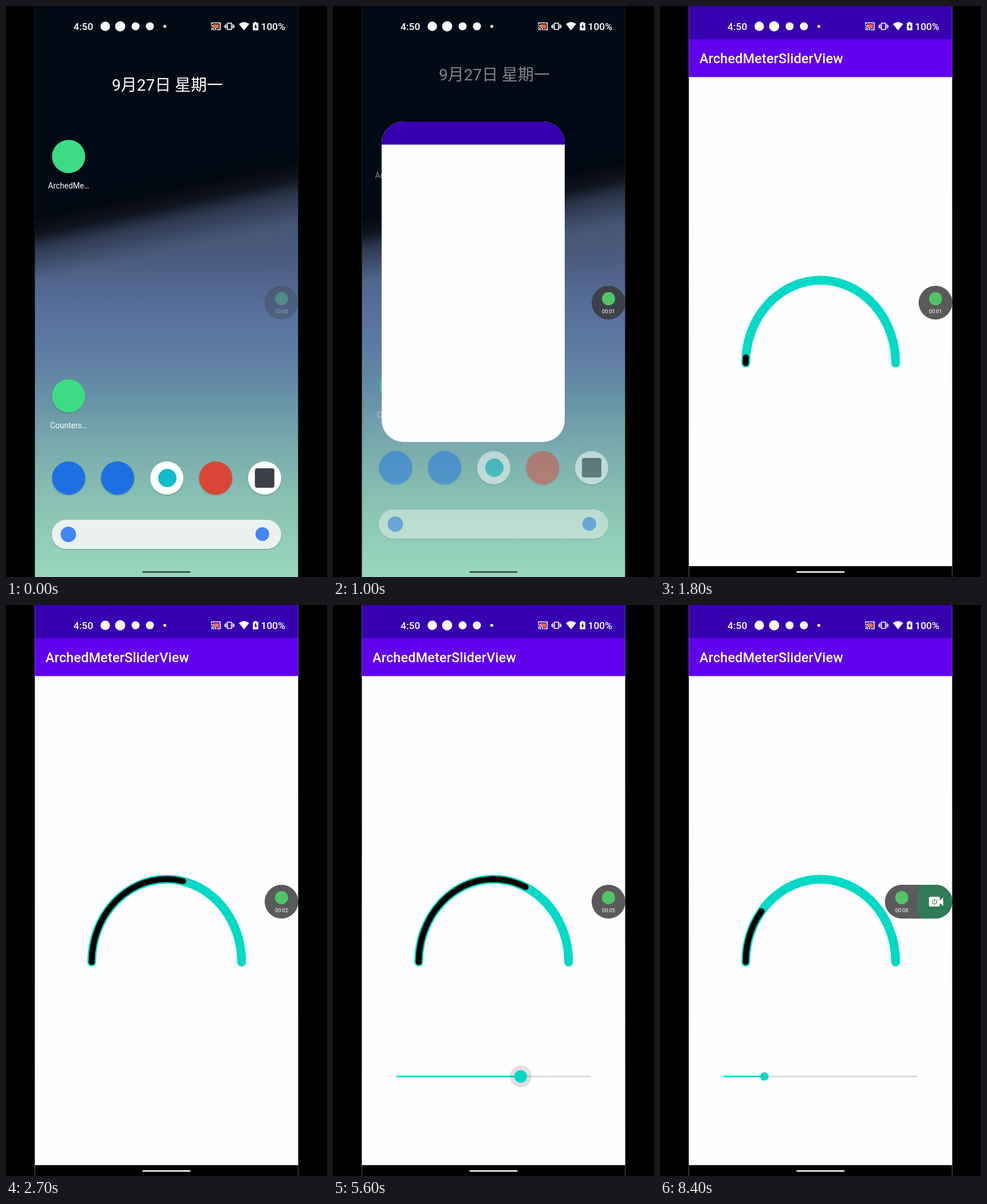
An HTML page that plays this animation: 561x998 px, repeating every 8.5 s.

```html
<!DOCTYPE html>
<html lang="zh-CN">
<head>
<meta charset="utf-8">
<title>Arc slider demo</title>
<style>
  html, body { margin: 0; width: 100%; height: 100%; overflow: hidden; background: #000; }
  svg { display: block; width: 100vw; height: 100vh; }
  text { font-family: Roboto, "Noto Sans CJK SC", "Noto Sans CJK", sans-serif; fill: #fff; }
  .mid { text-anchor: middle; }
  .label { font-size: 13.8px; text-anchor: middle; }
  .date { font-size: 28px; text-anchor: middle; }
  .status { font-size: 17.4px; font-weight: 500; }
  .title { font-size: 23.4px; font-weight: 500; letter-spacing: .0075em; }
  .timer { font-size: 9.2px; text-anchor: middle; }
  .line { fill: none; stroke-linecap: round; }
</style>
</head>
<body>
<svg viewBox="0 0 561 998">
  <defs>
    <linearGradient id="sky" gradientUnits="userSpaceOnUse" x1="0" y1="300" x2="0" y2="998">
      <stop offset="0" stop-color="#3f4d68"/>
      <stop offset=".2" stop-color="#4a5c7e"/>
      <stop offset=".32" stop-color="#566f9a"/>
      <stop offset=".43" stop-color="#5d7ba2"/>
      <stop offset=".54" stop-color="#668fa6"/>
      <stop offset=".66" stop-color="#78a8ad"/>
      <stop offset=".8" stop-color="#88c0b2"/>
      <stop offset="1" stop-color="#9ad8bd"/>
    </linearGradient>
    <linearGradient id="night" gradientUnits="userSpaceOnUse" x1="70" y1="322" x2="101.8" y2="469">
      <stop offset="0" stop-color="#020a16"/>
      <stop offset=".3" stop-color="#030912"/>
      <stop offset=".48" stop-color="#05090f" stop-opacity=".84"/>
      <stop offset=".65" stop-color="#080c14" stop-opacity=".4"/>
      <stop offset="1" stop-color="#101828" stop-opacity="0"/>
    </linearGradient>
    <linearGradient id="shade" x2="0" y2="1">
      <stop offset="0" stop-color="#cfcad6"/>
      <stop offset="1" stop-color="#fefdff"/>
    </linearGradient>
    <filter id="soft" x="-20%" y="-20%" width="140%" height="150%">
      <feDropShadow dx="0" dy="1" stdDeviation="1" flood-opacity=".3"/>
    </filter>
    <clipPath id="screen"><rect x="50.5" width="460" height="998"/></clipPath>
    <clipPath id="frame"><rect id="frameRect"/></clipPath>
  </defs>

  <rect width="561" height="998"/>

  <g clip-path="url(#screen)">
    <rect x="50" width="461" height="998" fill="url(#sky)"/>
    <rect x="50" width="461" height="998" fill="url(#night)"/>
    <g id="home">
      <text class="date" x="282" y="147.5">9月27日 星期一</text>
      <g filter="url(#soft)">
        <circle id="appIcon" cx="109.5" cy="263" r="29" fill="#3ddc84"/>
        <circle cx="109.5" cy="681.5" r="29" fill="#3ddc84"/>
        <circle cx="109.5" cy="825" r="29" fill="#1a6fe3"/>
        <circle cx="195" cy="825" r="29" fill="#1a6fe3"/>
        <circle cx="281" cy="825" r="29" fill="#fff"/>
        <circle cx="366.5" cy="825" r="29" fill="#db4437"/>
        <circle cx="452" cy="825" r="29" fill="#fff"/>
        <rect x="80" y="898" width="401" height="51" rx="25.5" fill="#eaf1ef"/>
      </g>
      <circle cx="282" cy="825" r="16" fill="#12bccb"/>
      <rect x="435" y="808" width="34" height="34" rx="4" fill="#3c4048"/>
      <circle cx="109" cy="923.5" r="13.5" fill="#4285f4"/>
      <circle cx="448" cy="923" r="12" fill="#4285f4"/>
      <text class="label" x="109.5" y="318.5">ArchedMe…</text>
      <text class="label" x="109.5" y="737.5">Counters…</text>
    </g>

    <g id="window" clip-path="url(#frame)">
      <g id="content">
        <rect x="50" width="461" height="998" fill="#fefdff"/>
        <rect x="50" width="461" height="58" fill="#3600b1"/>
        <rect x="50" y="979" width="461" height="19"/>
        <g id="page">
          <rect x="50" y="58" width="461" height="66" fill="#6100ed"/>
          <rect x="50" y="124" width="461" height="3" fill="url(#shade)"/>
          <text class="title" x="69" y="100">ArchedMeterSliderView</text>
          <path id="rail" class="line" stroke="#00dac6" stroke-width="15.4"/>
          <path id="fill" class="line" stroke="#000" stroke-width="10.4"/>
          <g id="slider">
            <path class="line" d="M112 824H449" stroke="#d8d8d8" stroke-width="2.5"/>
            <path id="active" class="line" stroke="#08d3c2" stroke-width="2.7"/>
            <circle id="ripple" cy="824" fill="#000"/>
            <circle id="thumb" cy="824" fill="#03d8c5"/>
          </g>
        </g>
      </g>
    </g>
    <rect id="handle" x="238.5" y="988" width="84" height="2.6" rx="1.3"/>
  </g>

  <g fill="#fff">
    <text class="status" x="118" y="42">4:50</text>
    <circle cx="173.5" cy="35.5" r="8.3"/>
    <circle cx="199.5" cy="35.5" r="8.9"/>
    <circle cx="226.5" cy="35.5" r="7"/>
    <circle cx="251.5" cy="35.5" r="7"/>
    <circle cx="277.5" cy="35.5" r="2.6"/>
    <path d="M362 32H372V39.500H368Q366 35 362 34Z" fill="#ff6a3d"/>
    <g class="line" stroke="#fff" stroke-width="1.6" stroke-linecap="butt">
      <path d="M359.300 32V29.500H374.300V41.500H369M359 34.500A7.500 7.500 0 0 1 366.500 42M359 38A4 4 0 0 1 363 42"/>
      <path d="M387 30H394V41H387ZM384.500 32V39M396.500 32V39M382.500 34V37.500M398.500 34V37.500"/>
    </g>
    <circle cx="360" cy="41" r="1.2"/>
    <path d="M416 42.500L407 31.500Q416 24.500 425 31.500Z"/>
    <path d="M434 28H438V29.500H441V42.500H431.500V29.500H434Z"/>
    <path d="M437 31L433.500 36.800H435.700V41L439 35.200H437Z" fill="#222"/>
    <text class="status" x="445.500" y="42">100%</text>
  </g>

  <g id="widget">
    <rect id="pill" y="489" height="59" rx="29.500" fill="#383838" fill-opacity=".82"/>
    <g id="stop">
      <path d="M462 489H481.500A29.500 29.500 0 0 1 481.500 548H462Q452 548 452 538V499Q452 489 462 489Z" fill="#2f7b57"/>
      <path d="M452 502V535" stroke="#777"/>
      <path d="M472 510H487Q489 510 489 512V516L495 511V526L489 521V525Q489 527 487 527H472Q470 527 470 525V512Q470 510 472 510Z" fill="#fff"/>
      <path class="line" d="M477.500 515.500A4 4 0 1 0 482.500 515.500M480 513.500V518" stroke="#2f7b57" stroke-width="1.200"/>
    </g>
    <g id="badge">
      <circle cx="481.500" cy="511.500" r="11.500" fill="#4fc566"/>
      <text id="timer" class="timer" x="481.500" y="537">00:00</text>
    </g>
  </g>
</svg>

<script>
const LOOP = 8500, STEP = 100;
const el = {};
document.querySelectorAll('[id]').forEach(node => el[node.id] = node);

const set = (node, attrs) => {
  for (const name in attrs) node.setAttribute(name, attrs[name]);
};
const show = (node, on) => set(node, { visibility: on ? 'inherit' : 'hidden' });

// Linear interpolation through rows of [time, ...values].
function track(t, rows) {
  if (t <= rows[0][0]) return rows[0].slice(1);
  const next = rows.findIndex(row => row[0] > t);
  if (next < 0) return rows[rows.length - 1].slice(1);
  const a = rows[next - 1], b = rows[next];
  const k = (t - a[0]) / (b[0] - a[0]);
  return a.slice(1).map((v, i) => v + (b[i + 1] - v) * k);
}

function arc(fraction) {
  if (fraction <= 0) return '';
  const angle = Math.PI * fraction;
  const x = 280.8 - 131 * Math.cos(angle), y = 624 - 144.8 * Math.sin(angle);
  return `M149.8 624A131 144.8 0 0 1 ${x} ${y}`;
}

// Columns: time, centre x, centre y, width, height, corner radius, opacity
const opening = [
  [800, 109.5, 263, 58, 58, 29, 0],
  [900, 179, 424.5, 144, 201, 49, .9],
  [1000, 245, 482, 320, 560, 38, 1],
  [1100, 274, 497, 430, 880, 18, 1],
  [1200, 280.5, 499, 461, 998, 0, 1]
];
const leaving = [[800, 0, 1], [900, -6, .85], [1000, -18, .5], [1200, -40, 0]];
const drag = [[4600, 1], [4900, .92], [5500, .68], [6200, .4], [6700, .28], [7100, .211]];
const press = [[4500, 0], [4700, 1], [7400, 1], [7800, 0]];

function drawHome(t) {
  const [shift, opacity] = track(t, leaving);
  set(el.home, { transform: `translate(0 ${shift})`, opacity });
  show(el.appIcon, t < 900);
}

function drawWindow(t) {
  const [cx, cy, width, height, rx, opacity] = track(t, opening);
  const x = cx - width / 2, y = cy - height / 2;
  set(el.frameRect, { x, y, width, height, rx });
  set(el.content, { transform: `translate(${x} ${y}) scale(${width / 461}) translate(-50 0)` });
  set(el.window, { opacity });
  show(el.page, t >= 1500);
  set(el.handle, { fill: t < 1200 ? '#33403f' : t < 1600 ? '#777' : '#fff' });
}

function drawGauge(t) {
  const intro = Math.min(1, Math.max(0, (t - 1610) / 2000));
  const value = t < 3700 ? (1 - Math.cos(Math.PI * intro)) / 2 : track(t, drag)[0];
  const [touch] = track(t, press);
  const x = 111 + 339 * value;
  set(el.rail, { d: arc(1) });
  set(el.fill, { d: arc(value) });
  set(el.active, { d: `M112 824H${x}` });
  set(el.thumb, { cx: x, r: 7.3 + 3.7 * touch });
  set(el.ripple, { cx: x, r: 8 + 11 * Math.sqrt(touch), opacity: .12 * touch });
  show(el.slider, t >= 3700);
}

function drawWidget(t) {
  const open = t >= 8400;
  set(el.widget, { opacity: track(t, [[0, .35], [300, 1]])[0] });
  set(el.pill, { x: open ? 393 : 452, width: open ? 118 : 59 });
  set(el.badge, { transform: `translate(${open ? -59 : 0} 0)` });
  show(el.stop, open);
  el.timer.textContent = '00:0' + Math.floor(t / 1000);
}

function draw(now) {
  const t = Math.floor((now % LOOP) / STEP) * STEP;
  drawHome(t);
  drawWindow(t);
  drawGauge(t);
  drawWidget(t);
}

const start = performance.now();
function tick() {
  draw(performance.now() - start);
  requestAnimationFrame(tick);
}
tick();
</script>
</body>
</html>
```
